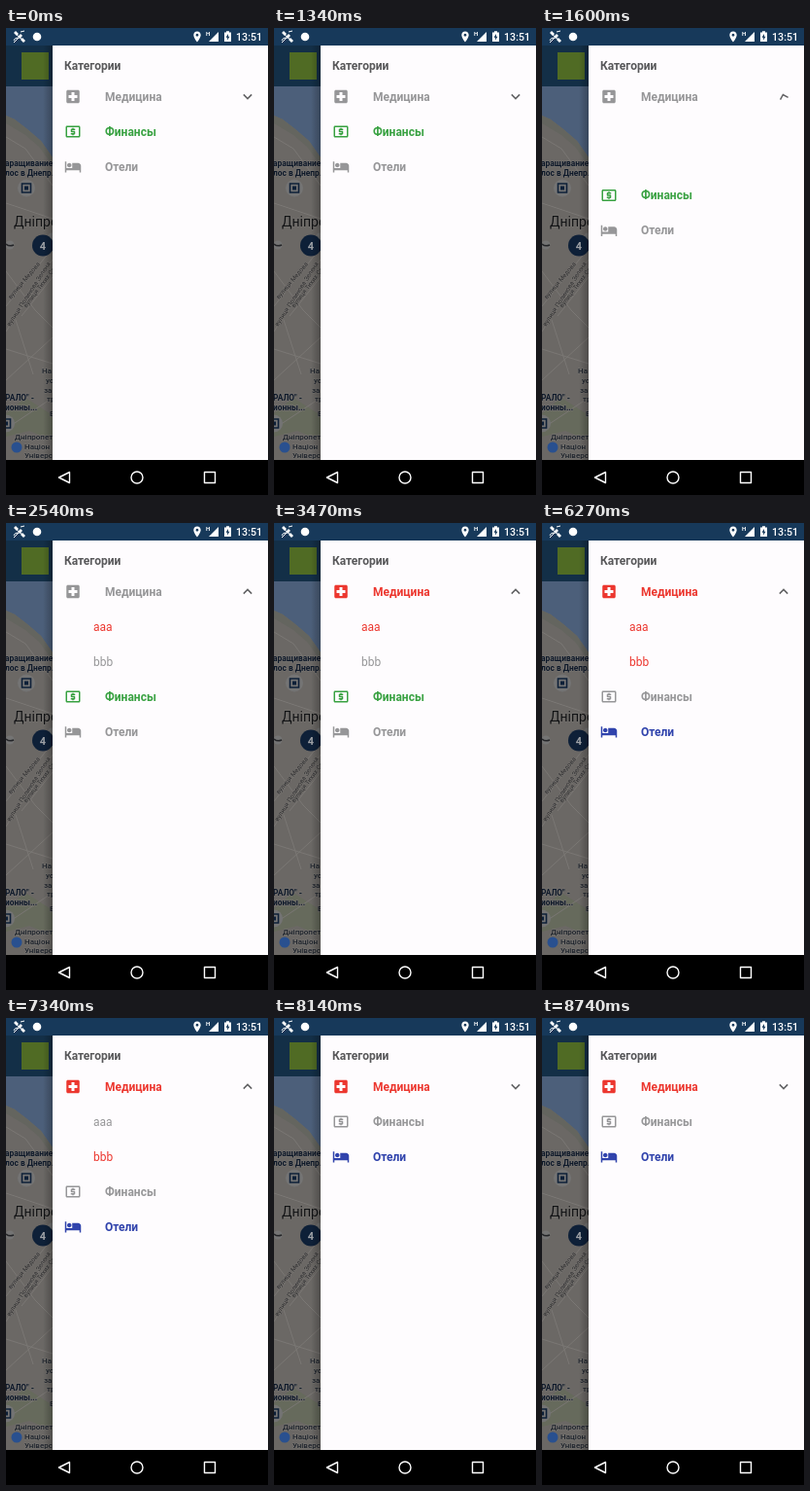
These frames come from a looping animation (270x480 px, 8810 ms). An HTML page:

```html
<!DOCTYPE html>
<html lang="ru">
<head>
<meta charset="utf-8">
<style>
  html, body { margin: 0; width: 100%; height: 100%; overflow: hidden; background: #000; }
  svg { display: block; width: 270px; height: 480px; font-family: Roboto, sans-serif; }
  .row text { font-size: 12px; }
  .row, #title { font-weight: 700; }
  .child { font-weight: 400; }
  .street { font-size: 6.5px; fill: #2c2c2e; }
  .place { font-size: 8.4px; font-weight: 700; fill: #0d1829; }
  .poi { font-size: 8px; fill: #1c222b; font-weight: 500; }
  .halo text { paint-order: stroke; stroke: #74716e; stroke-width: 1.4px; stroke-linejoin: round; }
</style>
</head>
<body>
<svg viewBox="0 0 270 480">
  <defs>
    <linearGradient id="shade">
      <stop offset="0" stop-opacity="0"/>
      <stop offset="1" stop-opacity=".25"/>
    </linearGradient>
    <clipPath id="mapArea"><path d="M0 60H48V444H0Z"/></clipPath>
  </defs>

  <!-- map, dimmed by the open drawer -->
  <g clip-path="url(#mapArea)">
    <path fill="#6b6865" d="M0 60H48V444H0Z"/>
    <path fill="#4c5f7a" d="M0 60H48V133L36 116 22 104 9 94 0 90Z"/>
    <path fill="#64655f" d="M0 90L9 94 22 104 36 116 48 133V141L34 122 20 110 0 98Z"/>
    <path fill="#666a5c" d="M0 396L20 380 48 398V424L24 414 0 420Z"/>
    <path fill="none" stroke="#7a7774" d="M0 112L20 124 48 162M0 180L48 196M0 286L48 226M0 312L48 238M16 296L48 256M0 250L30 290 48 308M0 330L48 345M10 300L28 356M0 362L48 318M0 412L48 380"/>
    <g class="halo">
      <g class="street">
        <text transform="translate(5 279) rotate(-50)">вулиця Медова</text>
        <text transform="translate(4 307) rotate(-57)">вулиця Полинова Зелена</text>
        <text transform="translate(21 288) rotate(-53)">вулиця Тихих Світанків</text>
      </g>
      <g class="place">
        <text x="-1" y="142">аращивание</text>
        <text x="-1" y="152">лос в Днепр...</text>
        <text x="-1" y="383">РАЛО" -</text>
        <text x="-1" y="393">ионны...</text>
      </g>
      <g class="poi">
        <text x="37" y="355">На</text>
        <text x="41" y="365">ус</text>
        <text x="39" y="375">за</text>
        <text x="42" y="384">тр</text>
        <text x="45" y="399">В</text>
        <text x="9" y="423">Дніпропет</text>
        <text x="19" y="433">Націон</text>
        <text x="19" y="442">Універс</text>
      </g>
      <text x="8" y="204" font-size="14" fill="#111214">Дніпро</text>
    </g>
    <g id="pin">
      <circle cx="21" cy="164.500" r="9" fill="#747474"/>
      <path fill="none" stroke="#0e2038" stroke-width="1.6" d="M16.500 160H25.500V169H16.500Z"/>
      <path fill="#0e2038" d="M19 162.500H23V166.500H19Z"/>
    </g>
    <use href="#pin" x="-21" y="242"/>
    <circle cx="4" cy="223" r="4.500" fill="#747474"/>
    <path fill="none" stroke="#242528" stroke-width="1.6" d="M0 222Q3 225 8 223"/>
    <circle cx="47" cy="214" r="3.500" fill="#747474"/>
    <circle cx="38" cy="223.500" r="11" fill="#0e2038"/>
    <text x="38" y="227.500" text-anchor="middle" font-size="11" font-weight="700" fill="#a0a3a8">4</text>
    <circle cx="11" cy="431" r="5.500" fill="#29508f"/>
  </g>

  <!-- toolbar, status bar and navigation bar -->
  <path fill="#132f47" d="M0 18H48V60H0Z"/>
  <path fill="#506b24" d="M16 25H44V53H16Z"/>
  <path fill="url(#shade)" d="M38 18H48V444H38Z"/>
  <path fill="#17395a" d="M0 0H270V18H0Z"/>
  <g fill="#fff">
    <path d="M8 5L10 3 13 6 11 8ZM15 12L17 10 20 13 18 15ZM12 9L15 6 17 8 14 11Z"/>
    <path fill="none" stroke="#fff" d="M10 6L18 13M8 13Q9 10 12 10M8 15L13 10M15 4L19 3"/>
    <circle cx="32" cy="9" r="4.300"/>
    <path fill-rule="evenodd" d="M197 3.500C194.800 3.500 193.300 5.100 193.300 7.200C193.300 10 197 14.500 197 14.500S200.700 10 200.700 7.200C200.700 5.100 199.200 3.500 197 3.500ZM197 5.800A1.400 1.400 0 1 1 196.990 5.800Z"/>
    <text x="206" y="7.500" font-size="6" font-weight="700">H</text>
    <path d="M219 4V14H209Z"/>
    <path d="M225 4.500H227V3.200H230V4.500H232V14H225Z"/>
    <path fill="#17395a" d="M229 6L226.500 9.800H228.100V12.500L230.500 8.700H229Z"/>
    <text x="237" y="13" font-size="10.700" font-weight="500">13:51</text>
  </g>
  <path d="M0 444H270V480H0Z"/>
  <g fill="none" stroke="#fff" stroke-width="1.400" stroke-linejoin="round">
    <path d="M65.500 456.500V467.500L54.500 462ZM204.500 456.500H215.500V467.500H204.500Z"/>
    <circle cx="135" cy="462" r="6"/>
  </g>

  <!-- drawer -->
  <path fill="#fefcfe" d="M48 18H270V444H48Z"/>
  <text id="title" x="60" y="43" font-size="12" fill="#58585a">Категории</text>
  <path id="press" fill="#303f9f" d="M48 196H270V232H48Z"/>
  <g id="list"></g>
  <path id="chevron" fill="none" stroke="#626264" stroke-width="1.500" d="M-4.200 -2.100L0 2.100 4.200 -2.100"/>
</svg>
<script>
const LOOP = 8810, OPEN = 1400, CLOSE = 7470, MOVE = 250, FADE = 120;
const GRAY = '#969698', RED = '#ec372f', GREEN = '#38a141', BLUE = '#3043ac';
const ICONS = {
  hospital: 'M19 3H5c-1.100 0-2 .9-2 2v14c0 1.100.9 2 2 2h14c1.100 0 2-.9 2-2V5c0-1.100-.9-2-2-2zm-1 11h-4v4h-4v-4H6v-4h4V6h4v4h4v4z',
  money: 'M11 17h2v-1h1c.55 0 1-.45 1-1v-3c0-.55-.45-1-1-1h-3v-1h4V8h-2V7h-2v1h-1c-.55 0-1 .45-1 1v3c0 .55.45 1 1 1h3v1H9v2h2v1zm9-13H4c-1.110 0-2 .89-2 2v12c0 1.110.89 2 2 2h16c1.110 0 2-.89 2-2V6c0-1.110-.89-2-2-2zm0 14H4V6h16v12z',
  bed: 'M7 13c1.660 0 3-1.340 3-3S8.660 7 7 7s-3 1.340-3 3 1.340 3 3 3zm12-6h-8v7H3V5H1v15h2v-3h18v3h2v-9c0-2.210-1.790-4-4-4z'
};
// Each row is coloured while on <= t < off; y is its centre when collapsed.
const rows = [
  { label: 'Медицина', icon: 'hospital', y: 70.5, color: RED, on: 2600, off: LOOP },
  { label: 'aaa', y: 106.5, color: RED, on: 2540, off: 6940 },
  { label: 'bbb', y: 142.5, color: RED, on: 3540, off: LOOP },
  { label: 'Финансы', icon: 'money', y: 106.5, color: GREEN, on: 0, off: 6270, slides: true },
  { label: 'Отели', icon: 'bed', y: 142.5, color: BLUE, on: 5270, off: LOOP, slides: true }
];

const $ = id => document.getElementById(id);
const clamp = x => Math.min(1, Math.max(0, x));
const ease = x => (1 - Math.cos(Math.PI * x)) / 2;
const ramp = (t, start, length) => clamp((t - start) / length);

$('list').innerHTML = rows.map(({ label, icon }) => icon
  ? `<g class="row"><path d="${ICONS[icon]}" transform="translate(60 -9) scale(.75)"/><text x="102" y="4.500">${label}</text></g>`
  : `<g class="row child"><text x="90" y="4.500">${label}</text></g>`).join('');
rows.forEach((row, i) => row.el = $('list').children[i]);

function draw(t) {
  // Opening slides first and then fades children in; closing runs in reverse order.
  const slide = ease(ramp(t, OPEN, MOVE)) - ease(ramp(t, CLOSE + FADE, MOVE));
  const fade = ramp(t, OPEN + MOVE, FADE) - ramp(t, CLOSE, FADE);
  const turn = ease(ramp(t, OPEN, MOVE)) - ease(ramp(t, CLOSE, MOVE));
  for (const { el, icon, y, color, on, off, slides } of rows) {
    el.setAttribute('transform', `translate(0 ${y + (slides ? 72 * slide : 0)})`);
    el.setAttribute('fill', t >= on && t < off ? color : GRAY);
    if (!icon) el.setAttribute('opacity', fade);
  }
  $('chevron').setAttribute('transform', `translate(249 70.5) rotate(${180 * turn})`);
  $('press').setAttribute('opacity', t < 5270 ? 0 : 0.03 * (1 - ramp(t, 5270, 470)));
}

function tick() {
  draw(performance.now() % LOOP);
  requestAnimationFrame(tick);
}
tick();
</script>
</body>
</html>
```
